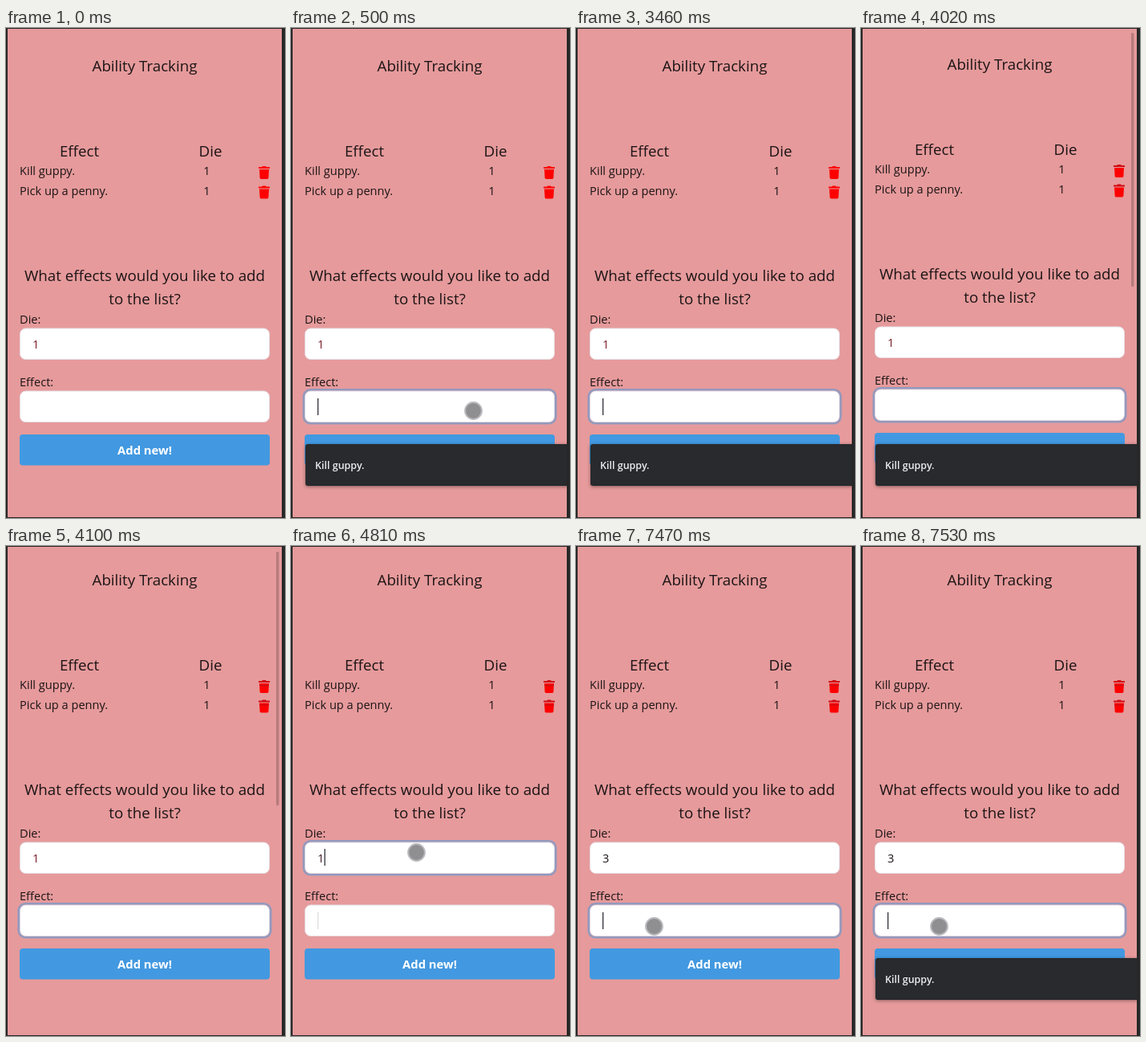
Animation of 348x610 px, one loop 7990 ms. Source, as an HTML page:

```html
<!DOCTYPE html>
<html lang="en">
<head>
<meta charset="utf-8">
<title>Ability Tracking</title>
<style>
  html, body { margin: 0; width: 100%; height: 100%; overflow: hidden; background: #272727; }
  svg { display: block; width: 348px; height: 610px; }
  text { font: 14.6px "Open Sans", "Noto Sans", sans-serif; fill: #1c1416; }
  .big { font-size: 18.75px; }
  .mid { text-anchor: middle; }
  .bold { font-size: 14.8px; font-weight: 700; fill: #fff; }
  .hint { font-size: 12.5px; font-weight: 600; fill: #eceef1; }
  .box { fill: #fff; stroke: #e5dde3; }
  .ring { fill: none; stroke: #4299e1; stroke-opacity: .5; stroke-width: 2.6; }
  .caret { fill: #33303a; }
  .dot { fill: #8f8f91; stroke: #b9b9be; stroke-width: 2; }
  .menu { filter: drop-shadow(0 1px 2px rgba(0, 0, 0, .4)); fill: #282a2d; }
</style>
</head>
<body>
<svg viewBox="0 0 348 610">
  <defs>
    <g id="trash">
      <path d="M0 1.6Q0 1 .6 1H4.2L4.8 .2Q5 0 5.3 0H8.7Q9 0 9.2 .2L9.8 1H13.4Q14 1 14 1.6V3H0Z"/>
      <path fill="#f00" d="M1 4H13L12.4 14.6Q12.3 16 10.9 16H3.1Q1.7 16 1.6 14.6Z"/>
    </g>
    <rect id="field" x="17.5" y=".5" width="311" height="38.5" rx="7"/>
    <rect id="glow" x="15.8" y="-1.3" width="314.4" height="42.1" rx="8.5"/>
    <rect id="bar" width="1.3" height="21"/>
  </defs>

  <rect x="2" y="1" width="342" height="608" fill="#e69a9b"/>

  <g id="page">
    <text class="big mid" x="173" y="54">Ability Tracking</text>
    <text class="big mid" x="91.5" y="160">Effect</text>
    <text class="big mid" x="255" y="160">Die</text>
    <text x="17" y="183">Kill guppy.</text>
    <text x="17" y="208">Pick up a penny.</text>
    <text class="mid" x="250.5" y="183">1</text>
    <text class="mid" x="250.5" y="208">1</text>
    <g id="bins" fill="#f00">
      <use href="#trash" x="315" y="172"/>
      <use href="#trash" x="315" y="196.5"/>
    </g>
    <g data-on="4100-7990" fill="#b3121a">
      <rect x="316.2" y="178" width="11.6" height="1"/>
      <rect x="316.2" y="202.5" width="11.6" height="1"/>
    </g>

    <text class="big mid" x="173" y="315">What effects would you like to add</text>
    <text class="big mid" x="173" y="344">to the list?</text>

    <text x="17" y="368">Die:</text>
    <use class="box" href="#field" y="373.5"/>
    <use class="ring" href="#glow" y="373.5" data-on="4810-7470"/>
    <text x="33" y="399" style="fill:#7a1c28" data-on="0-4810">1</text>
    <text x="33" y="399" style="fill:#45202e" data-on="4810-5430">1</text>
    <text x="33" y="399" data-on="5670-7990">3</text>
    <use class="caret" href="#bar" x="41.5" y="382" data-on="4810-5270 5670-6210 6670-7250"/>
    <use class="caret" href="#bar" x="33" y="382" data-on="5430-5670"/>

    <text x="17" y="446">Effect:</text>
    <use class="box" href="#field" y="451.5"/>
    <use class="ring" href="#glow" y="451.5" data-on="500-4810 7470-7990"/>
    <use fill="#dedee0" href="#bar" x="33" y="461" data-on="4810-7470"/>
    <use class="caret" href="#bar" x="33" y="461"
      data-on="500-1040 1520-1980 2520-3000 3460-4020 4480-4810 7470-7990"/>

    <rect x="17" y="506" width="312" height="38.5" rx="4" fill="#4299e1"/>
    <text class="bold mid" x="173" y="531">Add new!</text>
  </g>

  <g id="menu" data-on="500-4100 7530-7990">
    <path class="menu" d="M21 518H346V570H21Q18 570 18 567V521Q18 518 21 518Z"/>
    <text class="hint" x="30" y="549">Kill guppy.</text>
  </g>

  <rect id="scroll" x="337" width="3.4" height="316" rx="1.5" fill="#000" fill-opacity=".2" data-on="4020-4650"/>
  <circle class="dot" cx="227.5" cy="476.5" r="10.4" data-on="500-580"/>
  <circle class="dot" cx="156.5" cy="381.5" r="10.4" data-on="4810-4970"/>
  <circle class="dot" cx="97.5" cy="473.5" r="10.4" data-on="7470-7990"/>

  <path d="M344 0H348V610H344Z" fill="#272727"/>
</svg>
<script>
  const LOOP = 7990;
  const $ = id => document.getElementById(id);
  const timed = [...document.querySelectorAll('[data-on]')].map(el => ({
    el, spans: el.dataset.on.split(' ').map(s => s.split('-').map(Number))
  }));

  function draw(t) {
    for (const { el, spans } of timed) {
      const on = spans.some(([from, to]) => t >= from && t < to);
      el.setAttribute('visibility', on ? 'visible' : 'hidden');
    }
    const offset = t < 4020 ? 0 : t < 4100 ? 2 : 5;
    $('page').setAttribute('transform', `translate(0 ${-offset})`);
    $('menu').setAttribute('transform', `translate(0 ${t < 4100 ? 0 : -5})`);
    $('scroll').setAttribute('y', t < 4100 ? 6 : 7);
    $('bins').setAttribute('fill', offset ? '#d00a12' : '#f00');
  }

  let start;
  function tick(now) {
    start ??= now;
    draw((now - start) % LOOP);
    requestAnimationFrame(tick);
  }
  draw(0);
  requestAnimationFrame(tick);
</script>
</body>
</html>
```
